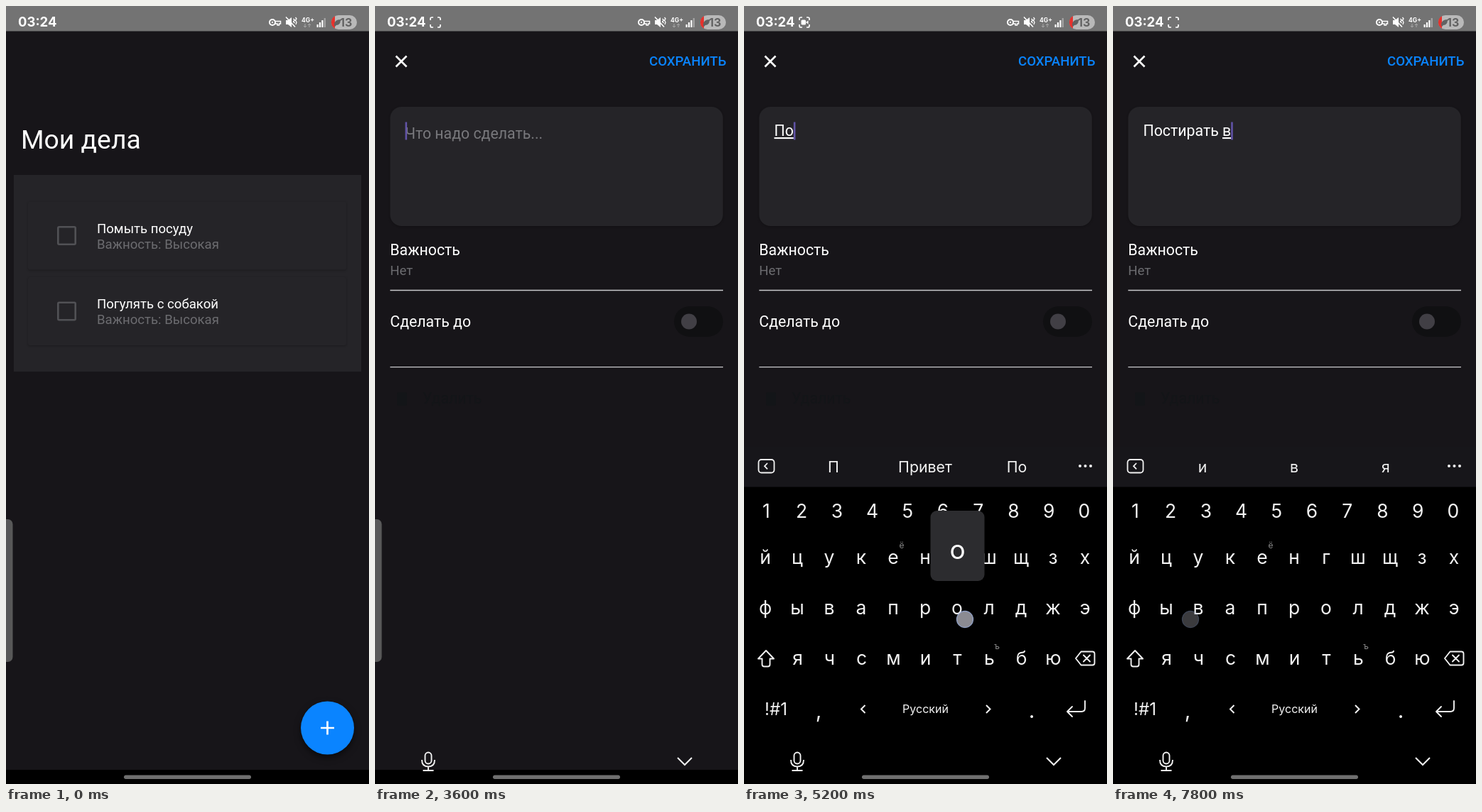
An HTML page for the animation above (8 s loop, 511x1096 px).

```html
<!DOCTYPE html>
<html lang="ru">
<head>
<meta charset="utf-8">
<style>
  html, body { margin: 0; width: 100%; height: 100%; overflow: hidden; background: #171519; }
  svg { display: block; width: 511px; height: 1096px; font-family: Roboto, sans-serif; }
  text { white-space: pre; }
  .ui { font-family: Inter, sans-serif; }
  .mid { text-anchor: middle; }
  .bold { font-weight: 700; }
  .medium { font-weight: 500; }
  .done { text-decoration: line-through; }
  .draft { text-decoration: underline; text-decoration-thickness: 1.3px; text-underline-offset: 2px; text-decoration-skip-ink: none; }
  .low { filter: drop-shadow(0 1px 1.5px #0004); }
  .high { filter: drop-shadow(0 4px 5px #0008); }
</style>
</head>
<body>
<svg id="stage" viewBox="0 0 511 1096"></svg>
<script>
const LOOP = 8000, STEP = 200;
const BG = '#171519', SURFACE = '#252428', BLUE = '#0a84ff', INK = '#fff', KEY = '#f2f2f2', DIM = '#6c6c70';
const stage = document.getElementById('stage');

const text = (x, y, size, fill, str, cls = '') =>
  `<text x="${x}" y="${y}" font-size="${size}" fill="${fill}" class="${cls}">${str}</text>`;
const label = (x, y, size, str, fill = KEY) => text(x, y, size, fill, str, 'ui mid');
const rect = (x, y, w, h, fill, r = 0, extra = '') =>
  `<rect x="${x}" y="${y}" width="${w}" height="${h}" rx="${r}" fill="${fill}" ${extra}/>`;
const circle = (x, y, r, fill, extra = '') => `<circle cx="${x}" cy="${y}" r="${r}" fill="${fill}" ${extra}/>`;
const line = (d, w = 2, color = KEY, extra = '') =>
  `<path d="${d}" fill="none" stroke="${color}" stroke-width="${w}" ${extra}/>`;
const shape = (d, fill = KEY) => `<path d="${d}" fill="${fill}"/>`;
const group = (content, attrs) => `<g ${attrs}>${content}</g>`;
const shift = (x, y, content) => group(content, `transform="translate(${x} ${y})"`);
const clamp = v => Math.min(1, Math.max(0, v));
const ROUND = 'stroke-linecap="round" stroke-linejoin="round"';

// Keyboard layout
const rows = [['йцукенгшщзх', 30, 786], ['фывапролджэ', 30, 857], ['ячсмитьбю', 75.5, 928]];
const keys = rows.flatMap(([chars, x, y]) => [...chars].map((ch, i) => ({ ch, x: x + i * 45, y })));
const keyAt = ch => keys.find(k => k.ch === ch.toLowerCase());

// Typing schedule
const typed = [[4800, 'П'], [5200, 'о'], [5400, 'с'], [5600, 'т'], [6600, 'и'], [6800, 'р'],
  [7000, 'а'], [7200, 'т'], [7400, 'ь'], [7600, ' '], [7800, 'в']];
const textAt = t => typed.filter(([at]) => at <= t).map(([, ch]) => ch).join('');
const hints = {
  'П': ['П', 'Привет', 'По'],
  'По': ['По', 'Пока', 'Пойдём'],
  'Пос': ['Пос', 'После', 'Посмотри'],
  'Пост': ['Пост', 'Постоянно', 'Постараюсь'],
  'Постирать ': ['и', 'в', 'я'],
};

function statusBar(t) {
  const camera = t % 1000 >= 200 && t % 1000 < 600;
  const recorder = line('M78 20v-2q0-2 2-2h2M88 16h2q2 0 2 2v2M92 26v2q0 2-2 2h-2M82 30h-2q-2 0-2-2v-2', 1.7, INK) +
    (camera ? rect(80.5, 19.5, 6.5, 7, INK, 1.5) + shape('M87.5 22.5l3-2v5l-3-2z', INK) : '');
  return rect(0, 0, 511, 35.5, '#737373') +
    text(17, 29, 18.5, INK, '03:24', 'ui bold') +
    (t >= 200 ? recorder : '') +
    circle(375, 23, 4, 'none', `stroke="${INK}" stroke-width="2"`) + circle(375, 23, 1.2, INK) +
    line('M379 21.5h7.5v3.5h-2v2h-2.5v-2h-3', 1.5, INK) +
    shape('M394 20h3l5-4v14l-5-4h-3z', INK) + line('M394 15.5l13 14', 1.6, INK) +
    line('M404.5 18l2 2-2 2 2 2M407.5 16l1.5 2-1.5 2 1.5 3-1 3', 1.3, INK) +
    text(416, 22.5, 8.5, INK, '4G+', 'ui bold') +
    line('M421 25v5m-2-2l2 2 2-2M427 30v-5m-2 2l2-2 2 2', 1, '#aaa') +
    [0, 1, 2, 3].map(i => rect(437.5 + i * 3.4, 26 - i * 3, 2.2, 4 + i * 3, i < 3 ? INK : '#a5a5a5', .6)).join('') +
    rect(458, 13, 36, 20, '#b9b9b9', 10) + shape('M463 14.3a10 10 0 0 0 0 17.4z', '#e5322d') +
    shape('M462 27q0-8 9-8q0 8-6 8l-2 2z', '#626262') +
    text(470, 28.5, 16, '#626262', '13', 'ui bold');
}

function task(y, title, done) {
  const box = done
    ? rect(72, y - 13.5, 27, 27, '#32d74b', 2.5) + line(`M77.5 ${y}l5.5 5.5 11-11`, 2.5, BG)
    : rect(73.3, y - 12.2, 24.4, 24.4, 'none', 1.5, 'stroke="#515155" stroke-width="2.6"');
  return rect(31, y - 48, 448, 96, SURFACE, 3, 'class="low"') + box +
    text(128, y - 4, 18.6, done ? DIM : INK, title, done ? 'done' : '') +
    text(128, y + 18, 18.6, DIM, 'Важность: Высокая');
}

function listScreen(t) {
  return text(21, 201, 37.3, INK, 'Мои дела') +
    rect(11, 238, 489, 277, SURFACE) +
    task(323.5, 'Помыть посуду', false) + task(430, 'Погулять с собакой', t >= 1000) +
    (t === 800 || t === 1000 ? circle(85.5, 430, 27, '#fff1') : '') +
    circle(452.5, 1017, 37.5, BLUE, 'class="high"') + line('M443 1017h19M452.5 1007.5v19', 2.7, INK);
}

function editScreen(t) {
  const str = textAt(t), cut = str.lastIndexOf(' ') + 1;
  const idle = t < 4800 ? t - 3400 : t - typed.findLast(([at]) => at <= t)[0];
  const cursorOn = t >= 3400 && idle % 1000 < 500;
  return line('M29.5 70.5l15 15m0-15l-15 15', 2.7, INK) +
    text(386, 84, 18.6, BLUE, 'СОХРАНИТЬ', 'medium') +
    rect(21.3, 142, 468.5, 168, SURFACE, 16, 'class="low"') +
    (str ? '' : text(42.5, 187, 21.3, '#78787c', 'Что надо сделать...')) +
    `<text id="draft" x="42.5" y="183" font-size="21.3" fill="${INK}">${str.slice(0, cut)}<tspan class="draft">${str.slice(cut)}</tspan></text>` +
    (cursorOn ? rect(42.5, 163.5, 2.6, 25, '#6153a6', 0, 'id="cursor"') : '') +
    text(21.3, 351, 21.3, INK, 'Важность') + text(21.3, 379, 18.6, DIM, 'Нет') +
    text(21.3, 451.5, 21.3, INK, 'Сделать до') +
    line('M21.3 400.5H490M21.3 508.7H490', 1.3, '#c9c9cc') +
    rect(421, 423, 69, 43, '#101012', 21.5) + circle(442, 444.5, 11, '#413f45') +
    rect(31, 544, 14, 19, '#131518', 2) + text(67, 560, 21.3, '#131518', 'Удалить');
}

function toolbar() {
  const at = (i, icon) => shift(45 + i * 89.8, 647, circle(0, 0, 21.5, '#2a2a2d') + icon);
  const star = (x, y, r) => shape(`M${x} ${y - r}q${r * .2} ${r * .8} ${r} ${r}q${-r * .8} ${r * .2} ${-r} ${r}q${-r * .2} ${-r * .8} ${-r} ${-r}q${r * .8} ${-r * .2} ${r} ${-r}`);
  const gear = Array.from({ length: 48 }, (_, i) => {
    const a = i * Math.PI / 24, r = 9.3 + 1.6 * Math.cos(6 * a);
    return `${(r * Math.sin(a)).toFixed(1)} ${(r * Math.cos(a)).toFixed(1)}`;
  }).join('L');
  const ring = `stroke="${KEY}" stroke-width="1.9"`;
  return at(0, star(1, 0, 9) + star(-6, -6, 4) + star(-5, 7, 3.5) + star(8, 7, 3)) +
    at(1, circle(0, 0, 10, 'none', ring) + circle(-3.5, -2.5, 1.5, KEY) + circle(3.5, -2.5, 1.5, KEY) + line('M-5 3q5 5 10 0', 1.8)) +
    at(2, rect(-9, -10, 18, 20, 'none', 3, ring) + line('M-4.5-10v4.5h9V-10', 1.8)) +
    at(3, line('M-4-4v-4q0-2 2-2H8q2 0 2 2V2q0 2-2 2H6', 1.9) + rect(-10, -4, 14, 14, '#2a2a2d', 2.5, ring) +
      line('M-6 7l3-8 3 8M-5 4.5h4', 1.6) + line('M7 9h3V6', 1.6)) +
    at(4, line(`M${gear}Z`, 1.9) + circle(0, 0, 3.5, 'none', ring));
}

function suggestions(words) {
  return rect(20.5, 639, 22, 18.5, 'none', 4, `stroke="${KEY}" stroke-width="1.8"`) +
    line('M33 644l-4 4.2 4 4.2', 1.8) +
    words.map((w, i) => label(126 + i * 129, 657, w.length > 9 ? 19.5 : 21.3, w)).join('');
}

function keyboard(t) {
  const before = textAt(t - STEP), caps = t === 4600 || t === 4800;
  const words = hints[before] || [before, 'Постирать', 'Постирала'];
  return rect(0, 621, 511, 57, '#17161a') + rect(0, 677.5, 511, 900, '#000') +
    (before ? suggestions(words) : toolbar()) +
    [473, 480.5, 488].map(x => circle(x, 648, 2, KEY)).join('') +
    [...'1234567890'].map((d, i) => label(31.5 + i * 49.7, 721, 26.5, d)).join('') +
    keys.map(k => label(k.x, k.y, 26.5, caps ? k.ch.toUpperCase() : k.ch)).join('') +
    label(222, 764, 12, 'ё', '#8a8a8a') + label(356, 906, 12, 'ъ', '#8a8a8a') +
    `<path d="M31 908l11 11.5h-5.5v8q0 3-3 3h-5q-3 0-3-3v-8H20z" fill="${caps ? KEY : 'none'}" stroke="${KEY}" stroke-width="1.9" ${ROUND}/>` +
    line('M474.5 909.5h16q3 0 3 3v13q0 3-3 3h-16l-7.5-9.5zM478 914.5l9 9m0-9l-9 9', 1.9, KEY, ROUND) +
    label(45, 999, 24, '!#1') + label(105, 1003, 30, ',') + label(405, 1003, 30, '.') +
    line('M170.5 985l-5.5 5.5 5.5 5.5M341 985l5.5 5.5-5.5 5.5', 2) +
    label(255.5, 996, 16, 'Русский') +
    line('M480 979v10q0 5-5 5h-20m7-7l-7 7 7 7', 1.9, KEY, ROUND);
}

function keyboardFooter() {
  return rect(70.5, 1051.5, 9, 16, 'none', 4.5, `stroke="${KEY}" stroke-width="1.9"`) +
    line('M66 1062q0 9.5 9 9.5t9-9.5M75 1071v5M67.5 1077h15', 1.9) +
    line('M426 1059l10 10 10-10', 2);
}

function touch(x, y, faint) {
  return circle(x, y, 11.5, '#a4a4ac', `stroke="#a9bce8" stroke-width="1.3" opacity="${faint ? .36 : .85}"`);
}

function keyPress(t) {
  const press = typed.find(([at]) => at === t || at === 4800 && t === 5000);
  if (!press) return '';
  const [at, ch] = press;
  if (ch === ' ') return touch(270, 991);
  const { x, y } = keyAt(ch), faint = at !== t || ch === 'в';
  const popup = rect(x - 37.5, y - 146, 76, 99, '#2c2c2f', 9) + label(x + .5, y - 78, 37, ch, INK);
  return (faint ? '' : popup) + touch(x + (x > 160 ? 11 : -11), y + 7, faint);
}

function frame(t) {
  const fade = 1 - (1 - clamp((t - 2200) / 800)) ** 2;
  const slide = 500 * Math.exp(-.0138 * (t - 3600));
  const typing = t >= 3600;
  const taps = { 800: [88, 434], 2000: [455, 1022], 2200: [455, 1022, true], 3400: [215, 215], 4400: [33, 928] };
  return rect(0, 0, 511, 1096, BG) +
    (fade < 1 ? group(listScreen(t), `opacity="${1 - fade}"`) : '') +
    (fade > 0 ? group(editScreen(t), `opacity="${fade}"`) : '') +
    (typing ? shift(0, slide, keyboard(t)) : '') +
    rect(0, 1076, 511, 20, '#000') +
    (typing ? keyboardFooter() + keyPress(t) : '') +
    (t < 4000 ? rect(-12, 723, 21.5, 201, '#585858', 7) : '') +
    rect(166, 1083.5, 179, 5.5, '#6f6f6f', 2.7) +
    statusBar(t) + (taps[t] ? touch(...taps[t]) : '');
}

let shown = -1;
function tick() {
  const t = Math.floor(performance.now() % LOOP / STEP) * STEP;
  if (t !== shown) {
    shown = t;
    stage.innerHTML = frame(t);
    const cursor = document.getElementById('cursor');
    if (cursor) cursor.setAttribute('x', 42.5 + document.getElementById('draft').getComputedTextLength());
  }
  requestAnimationFrame(tick);
}
tick();
</script>
</body>
</html>
```
